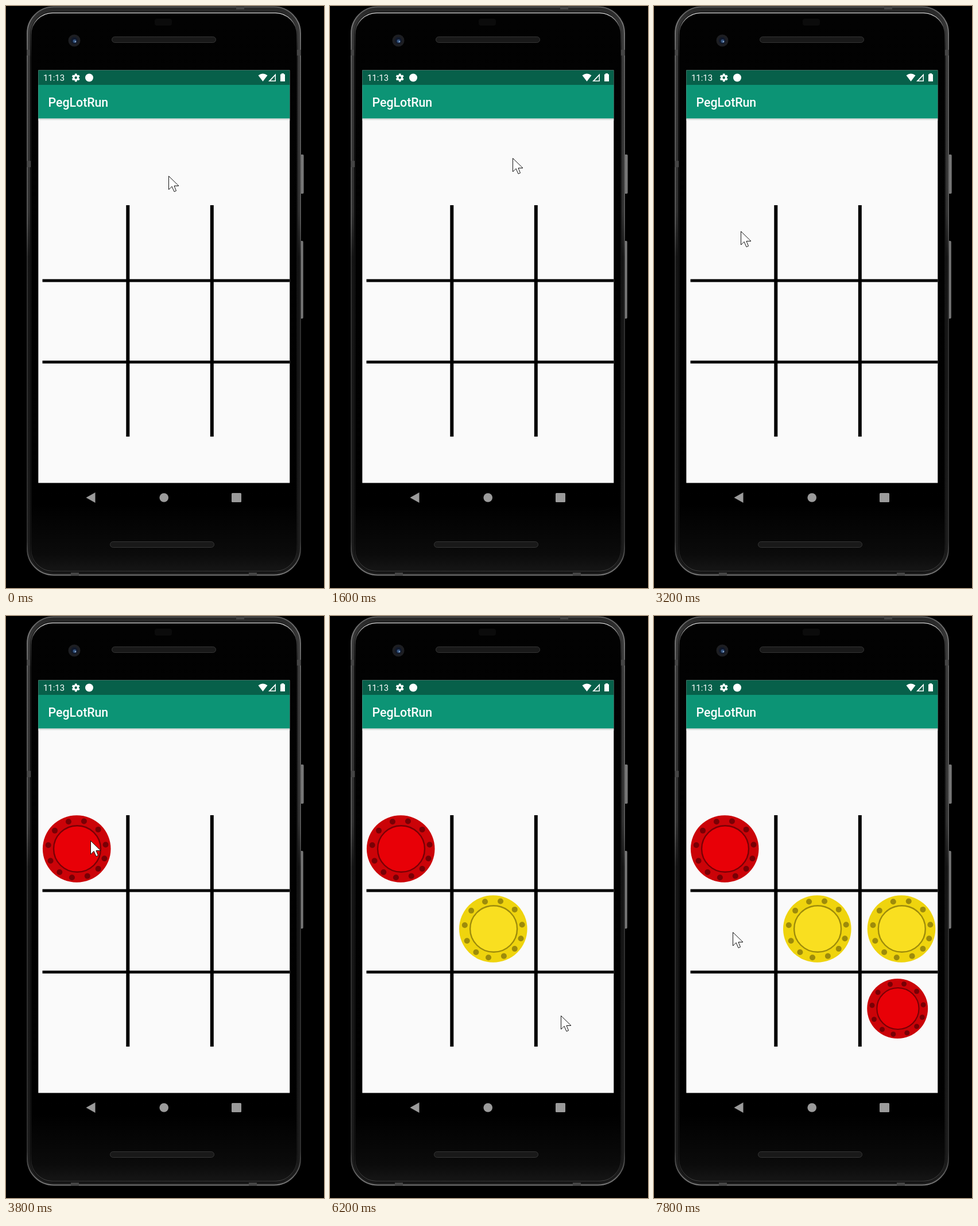
An HTML page for the animation above (8000 ms loop, 554x1011 px).

```html
<!DOCTYPE html>
<html lang="en">
<head>
<meta charset="utf-8">
<title>Board game on a phone</title>
<style>
  html, body { margin: 0; width: 100%; height: 100%; overflow: hidden; background: #000; }
  svg { display: block; width: 554px; height: 1011px; }
  text { font-family: Roboto, "Noto Sans", sans-serif; fill: #fff; }
</style>
</head>
<body>
<svg viewBox="0 0 554 1011">
  <defs>
    <linearGradient id="edge" x1="0" y1="0" x2="0" y2="1">
      <stop offset="0" stop-color="#5a5a5a"/>
      <stop offset=".03" stop-color="#777"/>
      <stop offset=".1" stop-color="#5c5c5c"/>
      <stop offset=".38" stop-color="#555"/>
      <stop offset=".44" stop-color="#303030"/>
      <stop offset=".94" stop-color="#303030"/>
      <stop offset="1" stop-color="#777"/>
    </linearGradient>
    <linearGradient id="band" x1="0" y1="0" x2="0" y2="1">
      <stop offset="0" stop-color="#262626"/>
      <stop offset=".04" stop-color="#3a3a3a"/>
      <stop offset=".36" stop-color="#303030"/>
      <stop offset=".44" stop-color="#141414"/>
      <stop offset="1" stop-color="#1c1c1c"/>
    </linearGradient>
    <linearGradient id="glass" x1="0" y1="0" x2="0" y2="1">
      <stop offset="0" stop-color="#020202"/>
      <stop offset=".88" stop-color="#000"/>
      <stop offset=".97" stop-color="#0b0b0b"/>
      <stop offset="1" stop-color="#161616"/>
    </linearGradient>
    <linearGradient id="rim" x1="0" y1="0" x2="0" y2="1">
      <stop offset="0" stop-color="#c8c8c8"/>
      <stop offset=".025" stop-color="#444"/>
      <stop offset=".08" stop-color="#161616"/>
      <stop offset=".95" stop-color="#161616"/>
      <stop offset="1" stop-color="#333"/>
    </linearGradient>
    <linearGradient id="shade" x1="0" y1="0" x2="0" y2="1">
      <stop offset="0" stop-color="#c4cbc9"/>
      <stop offset="1" stop-color="#fafafa"/>
    </linearGradient>
    <linearGradient id="key">
      <stop offset="0" stop-color="#333"/>
      <stop offset=".5" stop-color="#858585"/>
      <stop offset="1" stop-color="#555"/>
    </linearGradient>
  </defs>

  <rect width="554" height="1011"/>

  <!-- Phone body -->
  <g fill="url(#key)">
    <rect x="512" y="258" width="7" height="68" rx="2"/>
    <rect x="512" y="408" width="6" height="135" rx="2"/>
  </g>
  <rect x="37" y="1.5" width="476" height="987" rx="46" fill="url(#band)" stroke="url(#edge)" stroke-width="2"/>
  <rect x="42" y="10" width="466" height="974" rx="40" fill="#050505"/>
  <rect x="43.5" y="12" width="463.5" height="970" rx="38" fill="url(#glass)" stroke="url(#rim)" stroke-width="1.5"/>
  <path fill="#444" d="M36 76h6v10h-6zM36 269h7v11h-7zM507 76h7v10h-7zM401 1h14v5h-14zM113 984h14v5h-14zM423 984h14v5h-14z"/>
  <rect x="259" y="22" width="30" height="12" rx="4" fill="#0b0b0b"/>
  <g fill="#191919" stroke="#353535">
    <rect x="184.500" y="53.500" width="181" height="10" rx="5"/>
    <rect x="181.500" y="930.500" width="181" height="10" rx="5"/>
  </g>
  <circle cx="119" cy="60" r="10.500" fill="#1d1e22"/>
  <circle cx="119" cy="60" r="6" fill="#10182a"/>
  <circle cx="119.500" cy="61" r="3" fill="#33527c"/>
  <circle cx="121" cy="62" r="1.300" fill="#8ea8c8"/>

  <!-- Screen -->
  <rect x="56.300" y="111.500" width="438" height="717" fill="#fafafa"/>
  <rect x="56.300" y="111.500" width="438" height="26" fill="#07604a"/>
  <rect x="56.300" y="137" width="438" height="58.500" fill="#0c9475"/>
  <rect x="56.300" y="195.500" width="438" height="3.500" fill="url(#shade)"/>
  <text x="65" y="130" font-size="14.900">11:13</text>
  <text x="73.500" y="174.500" font-size="21.300" font-weight="500">PegLotRun</text>

  <!-- Status icons -->
  <g fill="#fff">
    <g transform="translate(121.700 124.500)">
      <circle r="3.800" fill="none" stroke="#fff" stroke-width="3.200"/>
      <g id="teeth"></g>
    </g>
    <circle cx="145" cy="124.500" r="7"/>
    <path d="M439.500 120.500Q447.500 114.500 455.500 120.500L447.500 131Z"/>
    <path d="M470 117.500V131H457Z"/>
    <path d="M468.500 121.500V129.500H461Z" fill="#07604a"/>
    <path d="M480 118.500V117H484V118.500H486V131H478V118.500Z"/>
  </g>

  <!-- Board -->
  <path d="M209.300 346h6v402h-6zM355.800 346h6v402h-6zM63.500 474.500H494.300v5H63.500zM63.500 616H494.300v5H63.500z"/>
  <g id="chips"></g>

  <!-- Navigation keys -->
  <g fill="#9b9b9b">
    <path d="M139.500 854L155.500 845V863Z"/>
    <circle cx="275.200" cy="854" r="7.800"/>
    <rect x="393" y="846" width="17" height="16" rx="1.500"/>
  </g>

  <path id="pointer" d="M.5 .5V24L6 18.500L10 27.500L13.500 26L10 17.500H18Z" fill="#fff" stroke="#111" stroke-width="1"/>
</svg>
<script>
const NS = 'http://www.w3.org/2000/svg';
const LOOP = 8000, STEP = 100;

function add(parent, tag, attrs) {
  const el = document.createElementNS(NS, tag);
  for (const name in attrs) el.setAttribute(name, attrs[name]);
  return parent.appendChild(el);
}

const teeth = document.getElementById('teeth');
for (let a = 0; a < 360; a += 60)
  add(teeth, 'rect', { x: -1.8, y: -7, width: 3.6, height: 3.4, transform: `rotate(${a})` });

const red = { rim: '#cb0308', face: '#e80007', mark: '#780005' };
const yellow = { rim: '#efd40e', face: '#f9df20', mark: '#9d8b0b' };
const dotAngles = [-107, -76, -43, -9, 19, 43, 69, 100, 127, 156, 188, 220];

function makeChip(x, y, scale, color, from) {
  const group = add(document.getElementById('chips'), 'g',
    { transform: `translate(${x} ${y}) scale(${scale})` });
  add(group, 'ellipse', { rx: 59.3, ry: 58.3, fill: color.rim });
  for (const deg of dotAngles) {
    const a = deg * Math.PI / 180;
    add(group, 'circle', { cx: 0.5 + 50.5 * Math.cos(a), cy: 0.5 + 50 * Math.sin(a), r: 5, fill: color.mark });
  }
  add(group, 'ellipse', { cx: 0.8, rx: 41, ry: 40.3, fill: color.face, stroke: color.mark, 'stroke-width': 2.4 });
  return { group, from };
}

const chips = [
  makeChip(123.2, 404.5, 1, red, 3800),
  makeChip(284.3, 543.5, 1, yellow, 4900),
  makeChip(424.2, 682, 0.893, red, 6400),
  makeChip(431, 543.5, 1, yellow, 7200)
];

// Pointer stops: time, x, y
const stops = [
  [800, 283, 295], [1600, 318, 264], [1700, 322, 268],
  [2100, 260, 500], [2500, 76, 378], [2600, 71, 368],
  [2700, 84, 354], [2900, 158, 392], [3000, 158, 392], [3300, 147, 390],
  [3800, 147, 390], [4500, 249, 556], [4900, 249, 556],
  [5400, 402, 694], [6400, 402, 694], [7000, 409, 545],
  [7200, 428, 556], [7800, 137, 549]
];

function pointerAt(t) {
  const i = stops.findIndex(s => s[0] > t);
  if (i === 0) return stops[0].slice(1);
  if (i < 0) return stops[stops.length - 1].slice(1);
  const [t0, x0, y0] = stops[i - 1], [t1, x1, y1] = stops[i];
  const k = (t - t0) / (t1 - t0);
  return [x0 + (x1 - x0) * k, y0 + (y1 - y0) * k].map(Math.round);
}

const pointer = document.getElementById('pointer');

function draw(time) {
  const t = Math.floor((time % LOOP) / STEP) * STEP;
  for (const { group, from } of chips)
    group.setAttribute('visibility', t >= from ? 'visible' : 'hidden');
  pointer.setAttribute('transform', `translate(${pointerAt(t)})`);
}

const start = performance.now();
function tick() {
  draw(performance.now() - start);
  requestAnimationFrame(tick);
}
tick();
</script>
</body>
</html>
```
